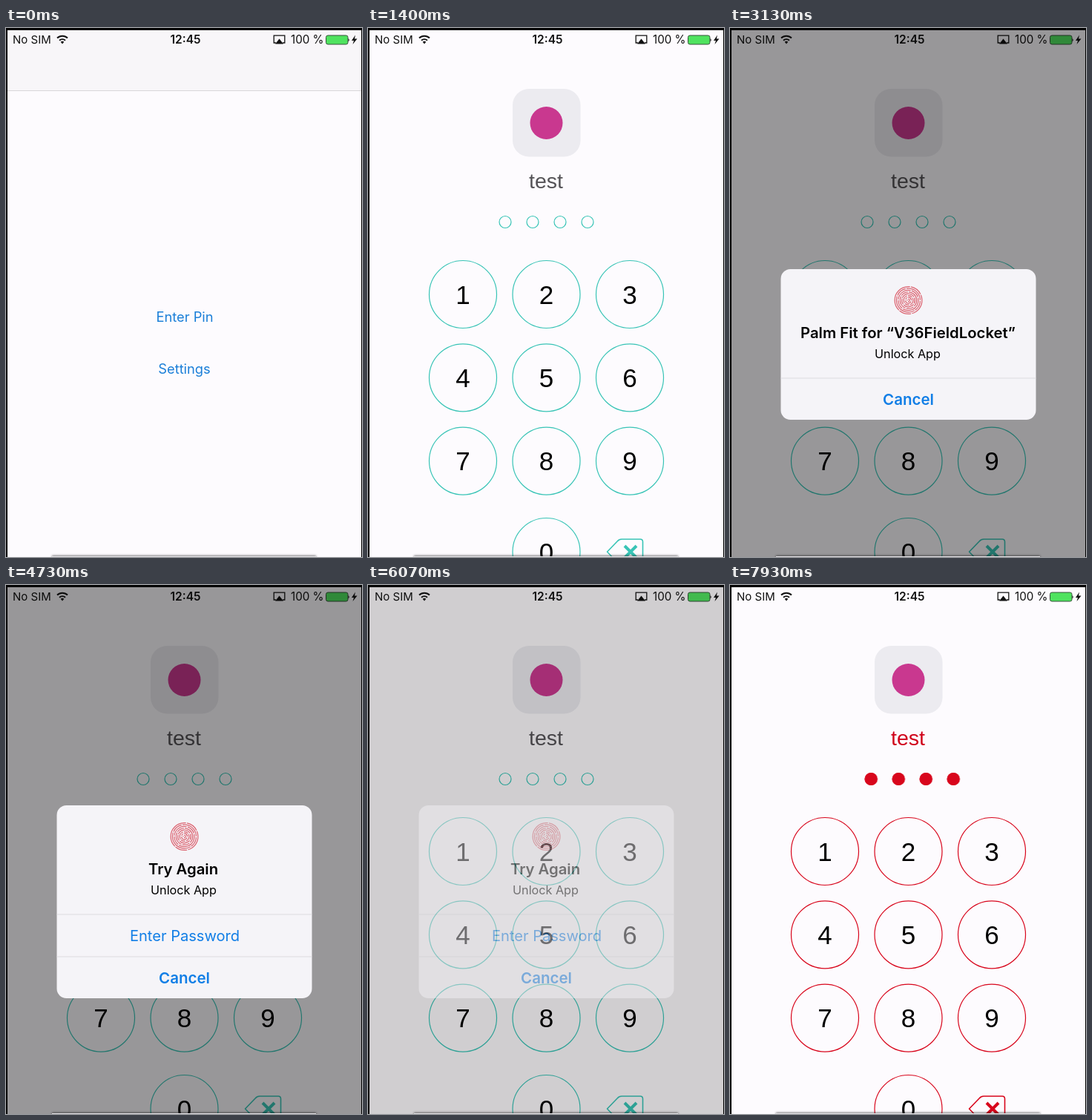
Recreate the animation shown at these times as an HTML page. Size 480 by 713 pixels, loop 8000 ms.

```html
<!DOCTYPE html>
<html lang="en">
<head>
<meta charset="utf-8">
<title>Pin unlock</title>
<style>
html, body { margin: 0; width: 100%; height: 100%; overflow: hidden; background: #000; }
svg { display: block; position: absolute; left: 0; top: 0; width: 480px; height: 713px; }
text { font-family: Inter, Roboto, sans-serif; text-anchor: middle; }
.start { text-anchor: start; }
.bold { font-weight: 600; }
.link { fill: #117ee6; }
.digit, #title { font-family: "Liberation Sans", Arial, sans-serif; }
.digit { font-size: 35px; }
.line { fill: none; stroke: currentColor; stroke-width: 1.2; }
.rule { stroke: #dcdbdf; }

/* Every part shares one 8 s clock */
.anim, .press { animation: 8s linear infinite; }
#pad { color: #38c4b6; }
.slide { animation-name: slide; }
#pad { animation-name: theme; animation-timing-function: step-end; }
#title { fill: #555357; animation-name: title; animation-timing-function: step-end; }
#dots { animation-name: shake; }
.fill { fill: currentColor; animation-timing-function: step-end; }
.press { fill: currentColor; animation-name: press; }
#tap { animation-name: tap; }
#dim { animation-name: dim; }
#alert { animation-name: alert; transform-origin: 240.5px 427px; }
#sheet { animation-name: grow; }
#head { animation-name: head; }
#foot { animation-name: foot; }
#ask { animation-name: fadeOut; }
.late { animation-name: fadeIn; }

@keyframes tap { 0%, 2% { opacity: 1 } 2.6%, 4% { opacity: .3 } 7%, 100% { opacity: 1 } }
@keyframes slide {
  0%, 3.75% { transform: translateY(713px); animation-timing-function: cubic-bezier(.2, .8, .2, 1) }
  10%, 100% { transform: none }
}
@keyframes dim { 0%, 18.4% { opacity: 0 } 21.6%, 73.4% { opacity: .4 } 77.9%, 100% { opacity: 0 } }
@keyframes alert {
  0%, 18.4% { opacity: 0; transform: scale(1.15); animation-timing-function: ease-out }
  21.6%, 73.4% { opacity: 1; transform: none }
  77.9%, 100% { opacity: 0; transform: none }
}
@keyframes grow { 0%, 51.6% { y: 325px; height: 203px } 53.1%, 100% { y: 297px; height: 260px } }
@keyframes head { 0%, 51.6% { transform: translateY(28px) } 53.1%, 100% { transform: none } }
@keyframes foot { 0%, 51.6% { transform: translateY(-28.7px) } 53.1%, 100% { transform: none } }
@keyframes fadeIn { 0%, 51.6% { opacity: 0 } 53.1%, 100% { opacity: 1 } }
@keyframes fadeOut { 0%, 51.6% { opacity: 1 } 53.1%, 100% { opacity: 0 } }
@keyframes press { 0%, 1.5% { opacity: 1 } 4%, 100% { opacity: 0 } }
@keyframes dot1 { 0% { opacity: 0 } 84.5%, 100% { opacity: 1 } }
@keyframes dot2 { 0% { opacity: 0 } 88.25%, 100% { opacity: 1 } }
@keyframes dot3 { 0% { opacity: 0 } 91.75%, 100% { opacity: 1 } }
@keyframes dot4 { 0% { opacity: 0 } 95%, 100% { opacity: 1 } }
@keyframes theme { 0% { color: #38c4b6 } 96.5%, 100% { color: #d8061c } }
@keyframes title { 0% { fill: #555357 } 96.5%, 100% { fill: #d0021b } }
@keyframes shake {
  0%, 96.5% { transform: none }
  97% { transform: translateX(9px) }
  98% { transform: translateX(-8px) }
  99.1% { transform: translateX(5.6px) }
  100% { transform: translateX(-4px) }
}
#edge {
  position: absolute; left: 62px; top: 711.5px; width: 356px; height: 3px;
  background: #e8e6ea; box-shadow: 0 -1px 3px rgba(0, 0, 0, .55);
}
#stage { position: relative; width: 480px; height: 713px; overflow: hidden; }
</style>
</head>
<body>
<div id="stage">
<svg viewBox="0 0 480 713">
  <rect x="2" y="3" width="477" height="710" fill="#fdfbfe"/>
  <rect x="2" y="3" width="477" height="81" fill="#f8f6f9"/>
  <path d="M2 84.5H479" stroke="#d8d6d9"/>
  <g fill="#1b7fd8" font-size="18.3">
    <text id="tap" class="anim" x="241" y="395.5">Enter Pin</text>
    <text x="240.5" y="465.5">Settings</text>
  </g>

  <g class="anim slide">
    <rect x="2" y="3" width="477" height="713" fill="#fdfbfe"/>
    <rect x="195" y="82" width="91.5" height="91.5" rx="22" fill="#ecebf0"/>
    <circle cx="240.5" cy="128" r="22" fill="#c9388f"/>
    <text id="title" class="anim" x="240" y="216" font-size="28.5">test</text>
    <g id="pad" class="anim">
      <g id="dots" class="anim"></g>
      <g id="keys"></g>
      <path class="line" style="stroke-width:1.6" stroke-linejoin="round"
        d="M322.5 706L336 692Q338.500 689 342 689H367Q370.500 689 370.500 692.500V719.500Q370.500 723 367 723H342Q338.500 723 336 720Z"/>
      <path class="line" style="stroke-width:4" d="M346 698L362 714M362 698L346 714"/>
    </g>
  </g>

  <g id="status" fill="#111">
    <text class="start" x="9" y="21" font-size="15">No SIM</text>
    <g fill="none" stroke="#111" stroke-width="2">
      <path d="M69 13.500A10 10 0 0 1 83 13.500"/>
      <path d="M72 16.800A6 6 0 0 1 80 16.800"/>
    </g>
    <path d="M73.700 18.800A3.300 3.300 0 0 1 78.300 18.800L76 21.500Z"/>
    <text class="bold" x="242" y="21" font-size="15.5">12:45</text>
    <path d="M364 20H361.200V10.200H375.800V20H373" fill="none" stroke="#111" stroke-width="1.3"/>
    <path d="M368.500 14.500L374 21.500H363Z"/>
    <text class="start" x="384" y="21" font-size="15.2">100 %</text>
    <rect x="431.5" y="10" width="29.500" height="12" rx="2.500" fill="#4fe35f" stroke="#39513c"/>
    <path d="M461.500 14Q464 16 461.500 18.500Z"/>
    <path d="M471 9.500L466 17H469L467.500 22L473.500 14.500H470Z"/>
  </g>

  <rect id="dim" class="anim" width="480" height="713" opacity="0"/>

  <g id="alert" class="anim">
    <rect id="sheet" class="anim" x="68.5" y="297" width="344" height="260" rx="13" fill="#f5f4f8"/>
    <g id="head" class="anim">
      <g id="print" fill="none" stroke="#dc6572" stroke-width="1.25"></g>
      <g class="bold" font-size="20.3">
        <text id="ask" class="anim" x="240" y="390">Palm Fit for “V36FieldLocket”</text>
        <text class="anim late" x="239" y="390">Try Again</text>
      </g>
      <text x="239.5" y="417" font-size="16.2">Unlock App</text>
      <path class="rule" d="M68.500 444H412.500"/>
    </g>
    <g class="anim late">
      <text class="link" x="241" y="480" font-size="20.1">Enter Password</text>
    </g>
    <g id="foot" class="anim">
      <path class="rule anim late" d="M68.500 501H412.500"/>
      <text class="link bold" x="240.5" y="537" font-size="20.5">Cancel</text>
    </g>
  </g>
  <path d="M0 0H480V713H479V3H2V713H0Z"/>
</svg>
<div id="edge"></div>
</div>
<script>
const LOOP = 8000;
const pressAt = { 4: 6760, 5: 7060, 6: 7340, 8: 7600 };

function add(parent, tag, attrs, text = "") {
  const el = document.createElementNS("http://www.w3.org/2000/svg", tag);
  for (const name in attrs) el.setAttribute(name, attrs[name]);
  el.textContent = text;
  document.getElementById(parent).append(el);
}

function addKey(label, cx, cy) {
  const at = { cx, cy, r: 45.5 };
  if (pressAt[label]) {
    add("keys", "circle", { ...at, class: "press", style: `animation-delay:${pressAt[label] - LOOP}ms` });
  }
  add("keys", "circle", { ...at, class: "line" });
  add("keys", "text", { x: cx, y: cy + 12.7, class: "digit" }, label);
}

for (let i = 0; i < 9; i++) {
  addKey(i + 1, 128 + 112.5 * (i % 3), 359 + 112.3 * Math.floor(i / 3));
}
addKey(0, 240.5, 706);

for (let i = 0; i < 4; i++) {
  const at = { cx: 185 + 37 * i, cy: 261.5 };
  add("dots", "circle", { ...at, r: 8, class: "line" });
  add("dots", "circle", { ...at, r: 8.5, class: "anim fill", style: `animation-name:dot${i + 1}` });
}

// Broken rings stand for the finger ridges
for (let i = 0; i < 8; i++) {
  const r = 1.6 + 2.4 * i;
  add("print", "circle", {
    cx: 240.5, cy: 339, r,
    "stroke-dasharray": `${r * 1.7} 1.3 ${r * 0.9} 1.1`,
    transform: `rotate(${i * 77} 240.5 339)`
  });
}
</script>
</body>
</html>
```
